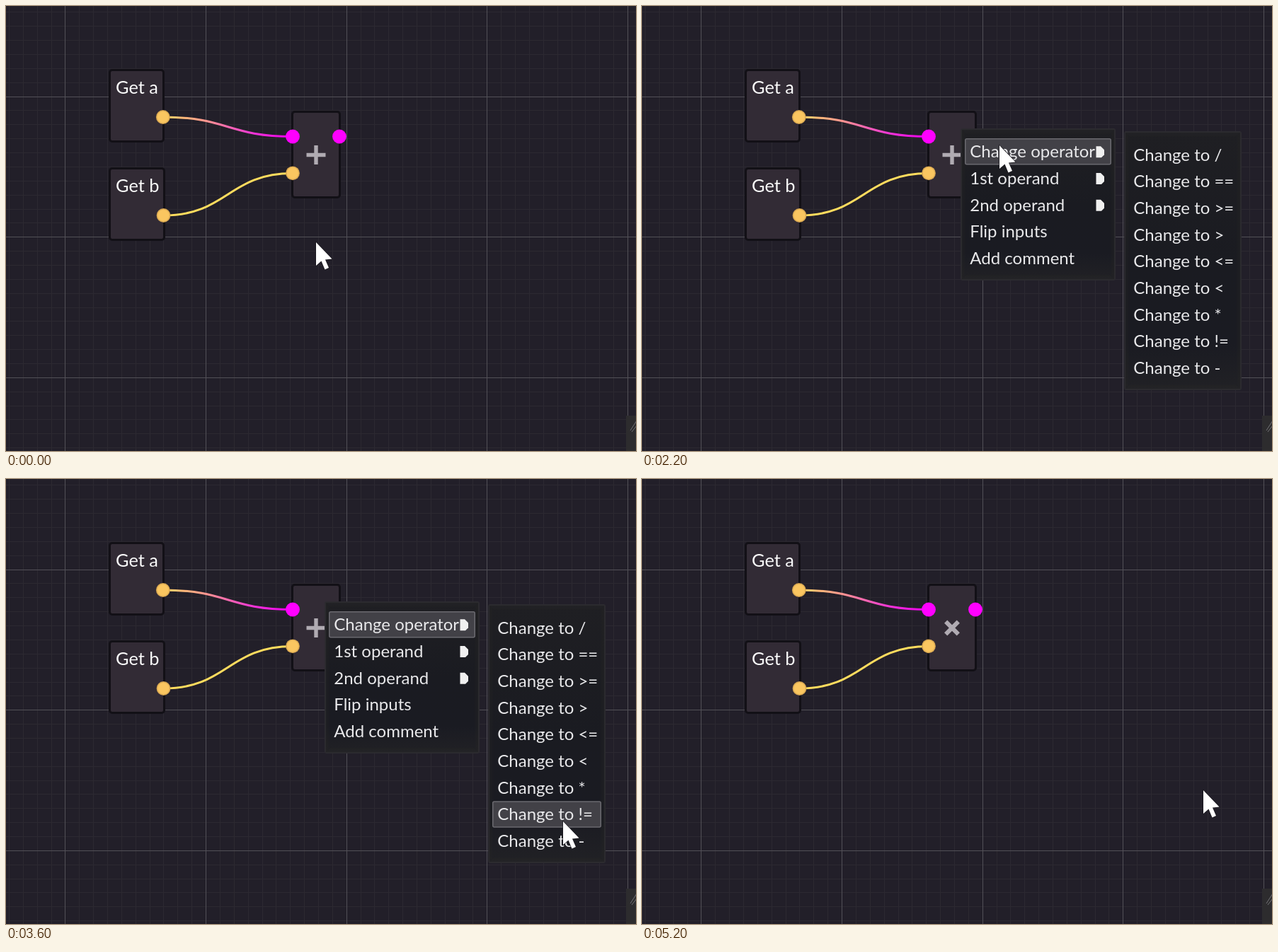
An HTML page that plays this animation: 890 px wide and 629 px high, repeating every 6 s.

```html
<!DOCTYPE html>
<html lang="en">
<head>
<meta charset="utf-8">
<title>Change operator</title>
<style>
html, body { margin: 0; width: 100%; height: 100%; overflow: hidden; background: #221f29; }
svg { display: block; width: 890px; height: 629px; font-family: Lato, "Open Sans", sans-serif; }
.title { font-size: 25.4px; fill: #fafafa; }
.item { font-size: 24px; fill: #e8e8ea; }
.node { fill: #322b35; stroke: #121016; stroke-width: 3; }
.hot { fill: #424147; stroke: #6b6a70; stroke-width: 1.5; }
.wire { fill: none; stroke-width: 3; }
</style>
</head>
<body>
<svg id="stage" viewBox="0 0 890 629">
  <defs>
    <linearGradient id="blend" gradientUnits="userSpaceOnUse" x1="225" y1="0" x2="400" y2="0">
      <stop offset="0" stop-color="#ffd766"/>
      <stop offset=".35" stop-color="#ff9193"/>
      <stop offset=".7" stop-color="#f037d4"/>
      <stop offset="1" stop-color="#ee00ee"/>
    </linearGradient>
    <radialGradient id="amber">
      <stop offset=".75" stop-color="#fac660"/>
      <stop offset="1" stop-color="#c99a4b"/>
    </radialGradient>
    <linearGradient id="panel" x1="0" y1="0" x2="0" y2="1">
      <stop offset="0" stop-color="#1f1f23"/>
      <stop offset=".5" stop-color="#1a1b21"/>
      <stop offset=".82" stop-color="#1a1b22"/>
      <stop offset="1" stop-color="#212125"/>
    </linearGradient>
  </defs>
  <g id="grid"></g>
  <g id="graph"></g>
  <g id="menus"></g>
  <path id="cursor" d="M0 0V33L7.5 26.5 12.5 38.5 18 36 13 24.5 22.5 23.5Z"
        fill="#fff" stroke="#17151b" stroke-width="1.2" paint-order="stroke"/>
</svg>
<script>
const LOOP = 6000, ROW = 37.7;
const $ = id => document.getElementById(id);

function add(parent, tag, attrs, text) {
  const el = document.createElementNS("http://www.w3.org/2000/svg", tag);
  for (const k in attrs) el.setAttribute(k, attrs[k]);
  if (text) el.textContent = text;
  parent.appendChild(el);
  return el;
}
const show = (el, on) => el.style.display = on ? "" : "none";

// Background grid, every tenth line is bright
const UNIT = 198.65;
function gridLines(major) {
  let d = "";
  for (let i = -10; i < 50; i++) {
    if ((i % 10 === 0) !== major) continue;
    const x = Math.floor(83.9 + i * UNIT / 10) + .5;
    const y = Math.floor(128.1 + i * UNIT / 10) + .5;
    d += `M${x} 0V629M0 ${y}H890`;
  }
  add($("grid"), "path", { d, stroke: major ? "#525057" : "#2c2931", fill: "none" });
}
gridLines(false);
gridLines(true);
add($("grid"), "path", { d: "M876 579H890V629H876Z", fill: "#2d2c2e" });
add($("grid"), "path", { d: "M882 600L891 586M884 602L891 593", stroke: "#747377", fill: "none" });

// Nodes, wires and ports
const graph = $("graph");
function node(x, y, w, h, title) {
  add(graph, "rect", { x: x + 1.5, y: y + 1.5, width: w - 3, height: h - 3, rx: 3.5, class: "node" });
  if (title) add(graph, "text", { x: x + 10, y: y + 35, class: "title" }, title);
}
function wire(x1, y1, x2, y2, stroke) {
  const m = (x1 + x2) / 2;
  add(graph, "path", { d: `M${x1} ${y1}C${m} ${y1} ${m} ${y2} ${x2} ${y2}`, stroke, class: "wire" });
}
function port(cx, cy, fill) {
  add(graph, "circle", { cx, cy, r: 9.9, fill });
}
node(145, 89, 79, 104, "Get a");
node(145, 228, 80, 104, "Get b");
node(403, 148, 70, 124);
wire(222, 157, 405, 184.5, "url(#blend)");
wire(222, 296, 405, 236.5, "#ffdc5e");
port(221.8, 157, "url(#amber)");
port(222.5, 296, "url(#amber)");
port(405, 236.3, "url(#amber)");
port(405, 184.5, "#f0f");
port(471, 184.5, "#f0f");

function operator(len, thick, turn) {
  const h = len / 2;
  return add(graph, "path", {
    d: `M${-h} 0H${h}M0 ${-h}V${h}`, stroke: "#b0abb2", "stroke-width": thick,
    transform: `translate(438 210.5) rotate(${turn})`
  });
}
const plus = operator(27, 5.4, 0);
const times = operator(25, 6, 45);

// Popup menus
function menu(x, y, w, h, firstY, labels, arrows) {
  const g = add($("menus"), "g", {});
  add(g, "rect", { x: x + 1, y: y + 1, width: w - 2, height: h - 2, rx: 2,
    fill: "url(#panel)", stroke: "#2c2b30", "stroke-width": 2 });
  for (let i = 1; i < 9; i++)
    add(g, "rect", { x: x + 1 + i, y: y + 1 + i, width: w - 2 - 2 * i, height: h - 2 - 2 * i,
      fill: "none", stroke: "#2a292c", opacity: .45 - i * .05 });
  const hot = add(g, "rect", { x: x + 6.75, width: w - 13.5, height: 36, rx: 2, class: "hot" });
  labels.forEach((label, i) => {
    const base = firstY + i * ROW;
    add(g, "text", { x: x + 13.3, y: base, class: "item" }, label);
    if (i < arrows)
      add(g, "path", { d: `M641.5 ${base - 16}h6.5l5 5v7l-4 4h-7.5z`, fill: "#f0f0f0" });
  });
  return row => {
    show(g, row !== null);
    show(hot, row >= 0);
    hot.setAttribute("y", firstY - 26.5 + Math.max(row, 0) * ROW);
  };
}
const setMain = menu(450, 173, 219, 215, 214.3,
  ["Change operator", "1st operand", "2nd operand", "Flip inputs", "Add comment"], 3);
const setSub = menu(681, 177, 166, 366, 218.5,
  ["/", "==", ">=", ">", "<=", "<", "*", "!=", "-"].map(op => "Change to " + op), 0);

// [time, cursor x, cursor y, main row, sub row]; null is closed, -1 is no highlight
const steps = [
  [0, 438, 334, null, null],
  [200, 442, 313, null, null],
  [400, 422, 238, null, null],
  [600, 443, 177, null, null],
  [800, 446, 173, null, null],
  [1000, 444, 166, null, null],
  [1200, 444, 166, -1, null],
  [1800, 489, 184, -1, null],
  [2000, 505, 197, 0, null],
  [2200, 505, 197, 0, -1],
  [2800, 647, 203, 0, -1],
  [3000, 740, 264, 0, 1],
  [3200, 762, 372, 0, 4],
  [3400, 780, 453, 0, 6],
  [3600, 787, 484, 0, 7],
  [3800, 793, 459, 0, 7],
  [4000, 793, 440, 0, 6],
  [4600, 793, 440, null, null]
];

function draw(t) {
  const [, x, y, main, sub] = steps.filter(s => s[0] <= t).pop();
  $("cursor").setAttribute("transform", `translate(${x} ${y})`);
  setMain(main);
  setSub(sub);
  show(plus, t < 4600);
  show(times, t >= 4600);
}

const start = performance.now();
function tick() {
  draw((performance.now() - start) % LOOP);
  requestAnimationFrame(tick);
}
tick();
</script>
</body>
</html>
```
